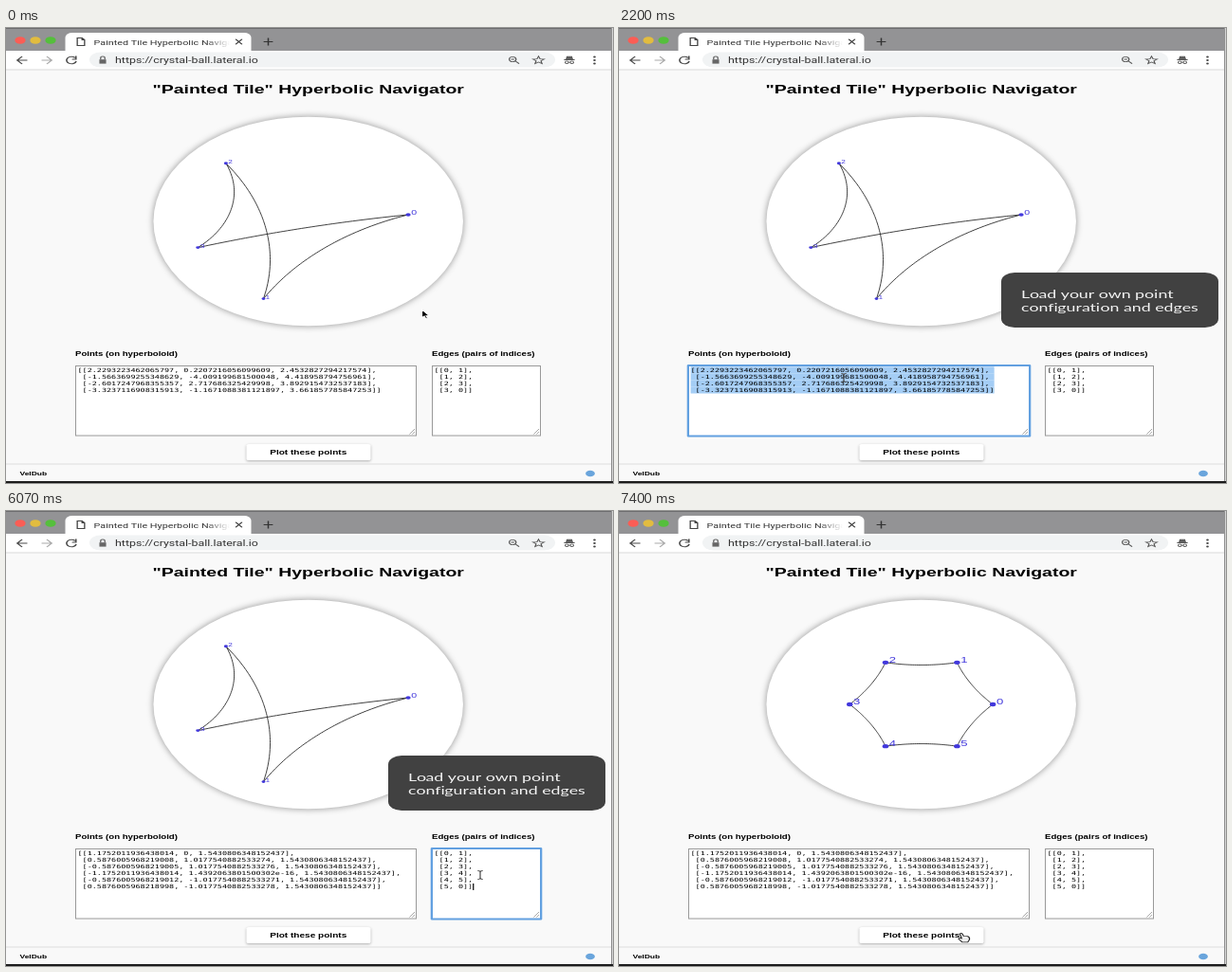
An HTML page with a canvas for the animation above (8 s loop, 640 by 480 pixels).

```html
<!DOCTYPE html>
<html lang="en">
<head>
<meta charset="utf-8">
<title>Hyperbolic Navigator</title>
<style>
  html, body { margin: 0; width: 100%; height: 100%; overflow: hidden; background: #f9f9f9; }
  canvas { display: block; }
</style>
</head>
<body>
<canvas id="stage" width="640" height="480"></canvas>
<script>
const ctx = document.getElementById('stage').getContext('2d');

const WIDE = 1.48;          // the whole screen is shown anamorphically, this much wider
const FPS = 15, TICKS = 120;
const DISK = { x: 318.7, y: 204, r: 110.3 };
const SANS = '"Liberation Sans", Arial, sans-serif';
const UI = 'Roboto, sans-serif';
const MONO = '5.71px "DejaVu Sans Mono", monospace';
const BLUE = '#4238dc';

const OLD_POINTS = `[[2.2293223462065797, 0.2207216056099609, 2.4532827294217574],
 [-1.5663699255348629, -4.009199681500048, 4.418958794756961],
 [-2.6017247968355357, 2.717686325429998, 3.8929154732537183],
 [-3.3237116908315913, -1.1671088381121897, 3.661857785847253]]`;
const NEW_POINTS = `[[1.1752011936438014, 0, 1.5430806348152437],
 [0.5876005968219008, 1.0177540882533274, 1.5430806348152437],
 [-0.5876005968219005, 1.0177540882533276, 1.5430806348152437],
 [-1.1752011936438014, 1.4392063801500302e-16, 1.5430806348152437],
 [-0.5876005968219012, -1.0177540882533271, 1.5430806348152437],
 [0.5876005968218998, -1.0177540882533278, 1.5430806348152437]]`;
const cycle = n => '[' + Array.from({ length: n }, (_, i) => `[${i}, ${(i + 1) % n}]`).join(',\n ') + ']';
const OLD_EDGES = cycle(4), NEW_EDGES = cycle(6);
const CAPTION = ['Load your own point', 'configuration and edges'];

const clamp = v => Math.max(0, Math.min(1, v));
const ease = v => v * v * (3 - 2 * v);
const random = i => { const v = Math.sin(i * 127.1 + 3) * 43758.5453; return v - Math.floor(v); };

// Runs draw() in page units with the origin at stage position (x, y).
function page(x, y, draw) {
  ctx.save();
  ctx.translate(x, y);
  ctx.scale(WIDE, 1);
  draw();
  ctx.restore();
}

function text(str, x, y, font, color, align = 'left') {
  page(x, y, () => {
    ctx.font = font;
    ctx.fillStyle = color;
    ctx.textAlign = align;
    ctx.fillText(str, 0, 0);
  });
}

function rect(x, y, w, h, color) {
  ctx.fillStyle = color;
  ctx.fillRect(x, y, w, h);
}

function round(x, y, w, h, r, color) {
  ctx.fillStyle = color;
  ctx.beginPath();
  ctx.roundRect(x, y, w, h, { x: r * WIDE, y: r });
  ctx.fill();
}

function disc(x, y, r, color) {
  ctx.fillStyle = color;
  ctx.beginPath();
  ctx.ellipse(x, y, r * WIDE, r, 0, 0, 7);
  ctx.fill();
}

function shadowed(blur, color, dy, draw) {
  ctx.save();
  ctx.shadowBlur = blur;
  ctx.shadowColor = color;
  ctx.shadowOffsetY = dy;
  draw();
  ctx.restore();
}

// Draws an SVG path in page units, stroked and optionally filled.
function icon(x, y, d, stroke, width = 1, fill) {
  page(x, y, () => {
    const path = new Path2D(d);
    if (fill) { ctx.fillStyle = fill; ctx.fill(path); }
    ctx.strokeStyle = stroke;
    ctx.lineWidth = width;
    if (stroke) ctx.stroke(path);
  });
}

function browser() {
  rect(0, 0, 640, 480, '#f9f9f9');
  rect(0, 0, 640, 25, '#939395');
  rect(0, 0, 640, 1, '#6c6c6e');
  ['#fb5d55', '#e2bc3f', '#55bf3c'].forEach((c, i) => disc(15 + 16 * i, 13, 3.8, c));

  round(62.5, 5, 196, 24, 5, '#fff');
  rect(0, 24, 640, 19.5, '#fff');
  rect(0, 43.5, 640, 1, '#dcdcdc');
  icon(79, 14.5, 'M-2.6 -4H.8L2.6 -2V4H-2.6ZM.8 -4V-2H2.6', '#444', 0.9);
  const fade = ctx.createLinearGradient(80, 0, 97, 0);
  fade.addColorStop(0, '#333');
  fade.addColorStop(1, '#3330');
  text('Painted Tile Hyperbolic Navigat', 92.5, 18, '7.3px ' + UI, fade);
  icon(245.5, 14.5, 'M-2.3 -2.8L2.3 2.8M2.3 -2.8L-2.3 2.8', '#333', 1);
  icon(276.5, 14.5, 'M-3.3 0H3.3M0 -4V4', '#333', 1);

  icon(17, 34, 'M3.7 0H-3.5M0 -4L-3.5 0L0 4', '#4a4a4a', 1.1);
  icon(43, 34, 'M-3.7 0H3.5M0 -4L3.5 0L0 4', '#aaa', 1.1);
  icon(69, 34, 'M2.6 -2.6A3.5 3.8 0 1 0 3.4 1M3.2 -4.4V-1H.4', '#4a4a4a', 1.1);
  round(88, 25.5, 491, 16, 8, '#f1f3f4');
  icon(102, 34, 'M-2.4 -.8H2.4V3.6H-2.4Z', '', 1, '#666');
  icon(102, 34, 'M-1.5 -.8V-2.4A1.5 1.6 0 0 1 1.5 -2.4V-.8', '#666', 0.9);
  text('https://crystal-ball.lateral.io', 115, 37, '8.4px ' + UI, '#333');
  icon(534.5, 33, 'M2.2 0A2.4 2.6 0 1 1 -2.6 0A2.4 2.6 0 1 1 2.2 0M1.6 1.8L4.4 4.6M-1.3 0H.9', '#555', 0.9);
  icon(561.5, 34, 'M0 -4.2L1.1 -1.3L4 -1.2L1.7 .7L2.5 3.6L0 2L-2.5 3.6L-1.7 .7L-4 -1.2L-1.1 -1.3Z', '#555', 0.8);
  icon(594, 34, 'M-3.8 -.5H3.8M-2.2 -1.2L-1.6 -3.8H1.6L2.2 -1.2Z', '#555', 0.8, '#555');
  icon(594, 34, 'M-.6 2.2A1.2 1.3 0 1 1 -3 2.2A1.2 1.3 0 1 1 -.6 2.2H.6A1.2 1.3 0 1 1 3 2.2A1.2 1.3 0 1 1 .6 2.2', '#555', 0.8);
  [30.5, 34, 37.5].forEach(y => disc(620.5, y, 0.9, '#444'));
}

function pageContent() {
  text('"Painted Tile" Hyperbolic Navigator', 318.7, 69, 'bold 13.15px ' + SANS, '#000', 'center');
  shadowed(7, 'rgba(0,0,0,.42)', 0, () => disc(DISK.x, DISK.y, DISK.r, '#fff'));
  text('Points (on hyperboloid)', 73, 346, 'bold 6.5px ' + SANS, '#000');
  text('Edges (pairs of indices)', 449, 346, 'bold 6.5px ' + SANS, '#000');
  shadowed(3, 'rgba(0,0,0,.3)', 1, () => round(253.5, 439, 131, 17, 1.5, '#fff'));
  text('Plot these points', 318.7, 450, 'bold 6.8px ' + SANS, '#000', 'center');
  rect(0, 459.5, 640, 1, '#dedede');
  text('VelDub', 14.5, 472, 'bold 5.7px ' + SANS, '#000');
  disc(616, 470, 3.3, '#6aa5dc');
}

function frameEdge() {
  rect(638, 0, 1, 480, '#8f8f8f');
  rect(639, 0, 1, 480, '#d5d5d5');
  rect(0, 478, 640, 2, '#1c1c1c');
}

const toDisk = ([x, y, z]) => [DISK.x + x / (1 + z) * DISK.r * WIDE, DISK.y - y / (1 + z) * DISK.r];

// Interpolates on the hyperboloid and projects to the Poincaré disk.
function geodesic(a, b) {
  ctx.beginPath();
  for (let i = 0; i <= 40; i++) {
    const [x, y, z] = a.map((v, j) => v + (b[j] - v) * i / 40);
    const n = Math.sqrt(z * z - x * x - y * y);
    ctx.lineTo(...toDisk([x / n, y / n, z / n]));
  }
  ctx.stroke();
}

function plot(points, edges) {
  ctx.strokeStyle = '#2c2c2c';
  ctx.lineWidth = 0.9;
  edges.forEach(([a, b]) => geodesic(points[a], points[b]));
  points.forEach((p, i) => {
    const [x, y] = toDisk(p);
    const size = Math.pow(2 / (1 + p[2]), 0.7);   // shrinks towards the rim
    disc(x, y, 2.6 * size, BLUE);
    text(i, x + 4.5 * size, y, `${10.5 * size}px ${SANS}`, BLUE);
  });
}

function textarea(x, w, str, { focused, selected, caret }) {
  const top = 356, height = 74.5, left = x + 2.5, row = 7.03;
  if (focused) round(x - 1.3, top - 1, w + 2.6, height + 2, 1, '#62a0e0');
  else rect(x, top, w, height, '#999');
  rect(x + 1, top + 1, w - 2, height - 2, '#fff');
  ctx.font = MONO;
  const advance = ctx.measureText('0').width * WIDE;
  const lines = str.split('\n');
  lines.forEach((line, i) => {
    const y = 363.3 + i * row, last = i === lines.length - 1;
    if (selected) rect(left, y - 6, (line.length + !last) * advance, row + 0.1, '#a4cdf5');
    text(line, left, y, MONO, '#000');
    if (caret && last) rect(left + line.length * advance, y - 5.5, 1.2, 7, '#000');
  });
  icon(x + w - 2, top + height - 2, 'M-3.8 0L0 -5.5M-1.8 0L0 -2.6', '#888', 0.6);
}

function caption(tick) {
  if (tick < 14 || tick >= 111) return;
  round(403, 258, 229, 58, 9.5, '#414141');
  const typed = Math.floor(2 + (tick - 14) * 40 / 11);
  const out = clamp((tick - 95) / 13);
  const font = '12px Lato, sans-serif';
  let n = 0;
  ctx.save();
  ctx.globalAlpha = 1 - Math.pow(out, 4);
  CAPTION.forEach((line, row) => {
    [...line].forEach((ch, i) => {
      if (n++ >= typed) return;
      ctx.font = font;
      const x = 424 + ctx.measureText(line.slice(0, i)).width * WIDE;
      const dx = (x - 512) * 0.15 + (random(n) - 0.5) * 15;
      const dy = (random(n + 90) - 0.5) * 10 + (row ? -1 : 3);
      text(ch, x + dx * out, 285 + row * 14 + dy * out, font, '#f4f4f4');
    });
  });
  ctx.restore();
}

// Pointer moves: start tick, end tick, target x and y.
const MOVES = [[0, 7, 237, 369], [78, 83, 500, 384], [95, 103, 366, 447], [103, 108, 363, 447]];

function pointer(tick) {
  let x = 438.5, y = 297;
  for (const [from, to, tx, ty] of MOVES) {
    const p = ease(clamp((tick - from) / (to - from)));
    x += (tx - x) * p;
    y += (ty - y) * p;
  }
  const inField = y > 357 && y < 430 && (x > 73 && x < 433 || x > 449 && x < 564);
  const onButton = y > 439 && x > 253 && x < 385;
  if (inField) {
    icon(x, y, 'M-1.8 -4.5Q0 -4.5 0 -3Q0 -4.5 1.8 -4.5M0 -3V3M-1.8 4.5Q0 4.5 0 3Q0 4.5 1.8 4.5', '#444', 0.8);
  } else if (onButton) {
    icon(x, y, 'M-2.4 -1Q-1.4 -2.2 -.6 -.8L.2 1.4L3 1.6Q4.8 2.4 4.4 5.2L3.2 7.8H-.8L-3.4 4.4Q-3.4 3 -1.2 3.8Z', '#222', 0.8, '#eee');
  } else {
    icon(x, y, 'M0 0V8.6L1.7 7L2.9 9.8L4.1 9.2L3 6.6H5.2Z', '#fff', 0.8, '#000');
  }
}

function draw(tick) {
  const blink = start => tick >= start && Math.floor((tick - start) / 7) % 2 === 0;
  const plotted = tick >= 111;
  const inPoints = tick >= 23 && tick < 87, inEdges = tick >= 87 && !plotted;

  browser();
  pageContent();
  plot(JSON.parse(plotted ? NEW_POINTS : OLD_POINTS), JSON.parse(plotted ? NEW_EDGES : OLD_EDGES));
  textarea(73, 360, tick < 65 ? OLD_POINTS : NEW_POINTS,
    { focused: inPoints, selected: tick >= 31 && tick < 65, caret: inPoints && blink(65) });
  textarea(449, 115, tick < 91 ? OLD_EDGES : NEW_EDGES,
    { focused: inEdges, selected: tick >= 89 && tick < 91, caret: inEdges && blink(91) });
  caption(tick);
  pointer(tick);
  frameEdge();
}

const start = performance.now();
function loop() {
  const ms = performance.now() - start;
  draw(Math.floor((ms + 4) * FPS / 1000) % TICKS);
  requestAnimationFrame(loop);
}
loop();
</script>
</body>
</html>
```
